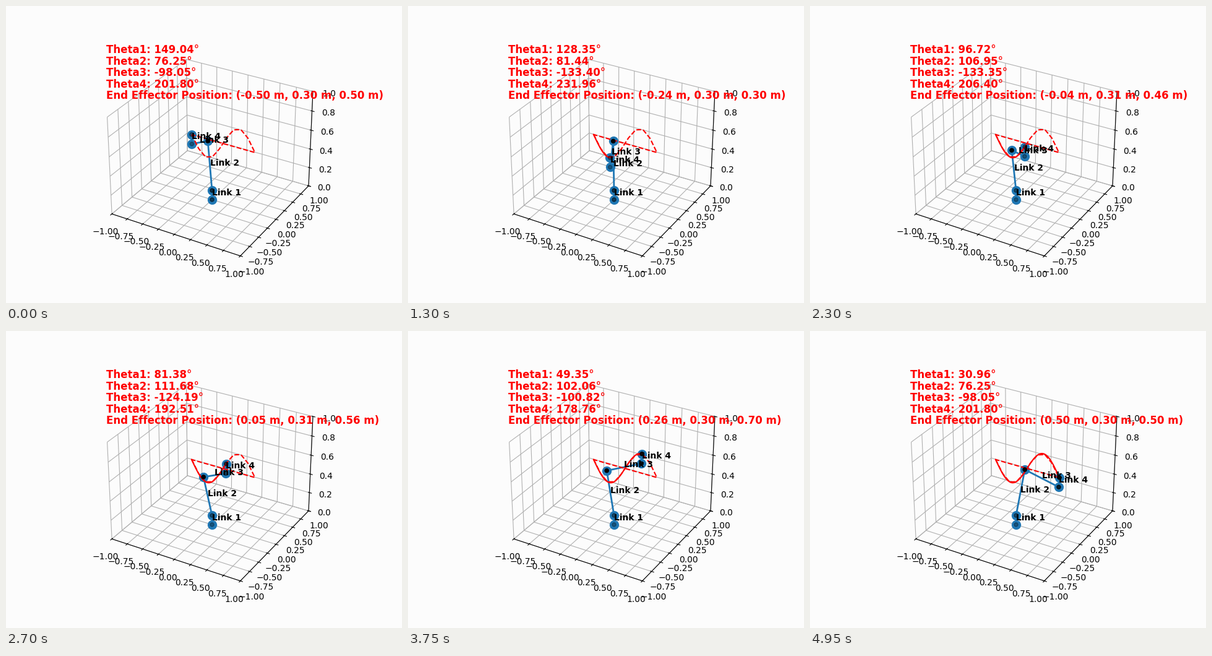
Animation, 640 px wide and 480 px high, one loop 5 s. Source, as a matplotlib script:

```python
import numpy as np
import matplotlib.pyplot as plt
from matplotlib.animation import FuncAnimation

N = 100
BASE, UPPER, FORE, TOOL = 0.1, 0.5, 0.5, 0.1
TOOL_PITCH = np.radians(87)
BG = "#fcfcfc"


def sine_path(n):
    """Points of the sine curve the arm follows, as rows x, y, z."""
    s = np.linspace(0, 1, n)
    return np.array([s - 0.5, np.full(n, 0.3), 0.5 - 0.2 * np.sin(2 * np.pi * s)])


def solve(x, y, z):
    """Joint angles that put the tool at the given point."""
    t1 = np.arctan2(y, x)
    r, h = np.hypot(x, y), z - TOOL - BASE
    c3 = (r * r + h * h - UPPER**2 - FORE**2) / (2 * UPPER * FORE)
    t3 = -np.arccos(np.clip(c3, -1, 1))
    t2 = np.arctan2(h, r) - np.arctan2(FORE * np.sin(t3), UPPER + FORE * np.cos(t3))
    return t1, t2, t3, np.pi - t2 - t3


def joints(t1, t2, t3):
    """Joint positions from the base to the tool tip, as rows x, y, z."""
    lengths = np.array([BASE, UPPER, FORE, TOOL])
    pitch = np.array([np.pi / 2, t2, t2 + t3, TOOL_PITCH])
    r = np.append(0, np.cumsum(lengths * np.cos(pitch)))
    z = np.append(0, np.cumsum(lengths * np.sin(pitch)))
    return np.array([r * np.cos(t1), r * np.sin(t1), z])


goals = sine_path(N)
angles = [solve(*p) for p in goals.T]
poses = [joints(*a[:3]) for a in angles]
tips = np.array([p[:, -1] for p in poses]).T

fig = plt.figure(figsize=(6.4, 4.8), dpi=100, facecolor=BG)
ax = fig.add_subplot(projection="3d", facecolor=BG)
ax.set(xlim=(-1, 1), ylim=(-1, 1), zlim=(0, 1))
for axis in (ax.xaxis, ax.yaxis, ax.zaxis):
    axis.set_pane_color((1, 1, 1, 0))

arm, = ax.plot([], [], [], "o-", color="tab:blue", lw=2, markersize=10)
guide = sine_path(10)
ax.plot(*np.column_stack([guide, guide[:, 0]]), "r--", lw=1.5)
trace, = ax.plot([], [], [], "r-", lw=1.5)
labels = [ax.text(0, 0, 0, f"Link {k}", color="black", weight="bold")
          for k in range(1, 5)]
readout = [ax.text2D(0.05, 0.95 - 0.05 * k, "", transform=ax.transAxes,
                     color="red", fontsize=12, weight="bold") for k in range(5)]
dots = []


def update(i):
    pose = poses[i]
    arm.set_data_3d(*pose)
    trace.set_data_3d(*tips[:, :i + 1])

    # depth shading depends on the whole pose, so the dots are made anew
    while dots:
        dots.pop().remove()
    dots.append(ax.scatter(*pose, c="black", s=20))

    for label, mid in zip(labels, (pose[:, :-1] + pose[:, 1:]).T / 2):
        label.set_position_3d(mid)
    for k, angle in enumerate(np.degrees(angles[i])):
        readout[k].set_text(f"Theta{k + 1}: {angle:.2f}°")
    x, y, z = pose[:, -1]
    readout[4].set_text(f"End Effector Position: ({x:.2f} m, {y:.2f} m, {z:.2f} m)")


anim = FuncAnimation(fig, update, frames=N, interval=50, repeat=True, repeat_delay=0)
plt.show()
```
